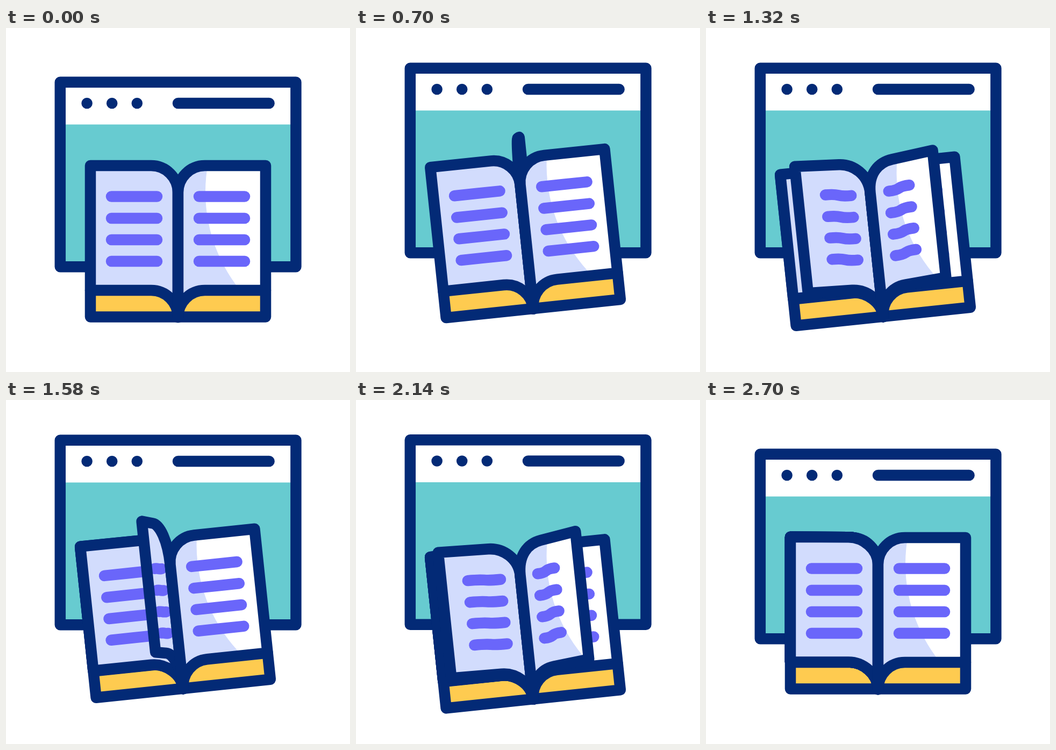
Animation, 640 px wide and 640 px high, one loop 3600 ms. Source, as an HTML page with a canvas:

```html
<!DOCTYPE html>
<html lang="en">
<head>
<meta charset="utf-8">
<title>Online book</title>
<style>
  html, body { margin: 0; width: 100%; height: 100%; overflow: hidden; background: #fff; }
  canvas { display: block; width: 100vw; height: 100vh; }
</style>
</head>
<body>
<canvas id="stage" width="640" height="640"></canvas>
<script>
const ctx = document.getElementById('stage').getContext('2d');
const NAVY = '#032a76', TEAL = '#67cbd0', LAVENDER = '#d2dcfd',
      VIOLET = '#6a66fa', YELLOW = '#fecb50', WHITE = '#fff';
const LOOP = 3600;
const STROKE = 20.5;

// Book geometry, relative to the middle of the book
const HALF = 163, TOP = -140.5, FOOT = 91.5, BOTTOM = 141, BEND = 50;
const ROWS = [-83, -42.5, -2.5, 37.5];

// Page turns overlap: one starts every TURN_GAP ms
const TURNS = 5, TURN_START = 460, TURN_GAP = 400, TURN_TIME = 505;

// [time, value] keys, eased in and out between neighbours
const WINDOW_Y = [[0, 0], [320, -51], [560, -26], [2120, -26], [2360, -51], [2680, 0]];
const BOOK_Y = [[0, 0], [180, 47.5], [520, 0], [560, 0], [840, -29], [1080, 0],
                [1630, 0], [2000, -29], [2240, 47.5], [2580, 0]];
const BOOK_TILT = [[0, 0], [220, 1], [2240, 1], [2560, 0]];

function valueAt(keys, t) {
  const i = keys.findIndex(k => k[0] > t);
  if (i < 0) return keys[keys.length - 1][1];
  const [t0, a] = keys[i - 1], [t1, b] = keys[i];
  return a + (b - a) * (1 - Math.cos(Math.PI * (t - t0) / (t1 - t0))) / 2;
}

function line(color, x0, y0, x1, y1) {
  ctx.strokeStyle = color;
  ctx.beginPath();
  ctx.moveTo(x0, y0);
  ctx.lineTo(x1, y1);
  ctx.stroke();
}

function drawWindow() {
  ctx.fillStyle = WHITE;
  ctx.fillRect(101, 101, 438.5, 343);
  ctx.fillStyle = TEAL;
  ctx.fillRect(101, 179.5, 438.5, 264.5);
  ctx.strokeStyle = NAVY;
  ctx.strokeRect(100.8, 100.8, 438.6, 343.4);
  ctx.fillStyle = NAVY;
  for (const x of [150.6, 197.2, 243.8]) {
    ctx.beginPath();
    ctx.arc(x, 140, 10.3, 0, Math.PI * 2);
    ctx.fill();
  }
  line(NAVY, 320, 140, 489.6, 140);
}

// Open angle u: 1 lies flat on the right, 0 stands up, -1 lies flat on the left
function pagePath(u, turned) {
  const side = Math.sign(u) || 1, a = Math.abs(u);
  const settle = turned && u < 0 ? a : 0;
  const lift = 38.5 * (1 - u * u) + 1.2 * settle;
  const footLift = 0.64 * lift;
  const tipX = HALF * u;
  const spread = 1 - (1 - a) ** 2;
  const bendX = side * spread * (BEND + 5 * settle);
  const bendLift = 1 - 0.7 * a * (1 - 0.4 * settle);
  const handle = 0.552 * BEND * spread;

  const edge = (base, up) => {
    const tip = [tipX, base - up];
    const bend = [bendX, base - up * bendLift];
    const dx = tip[0] - bend[0], dy = tip[1] - bend[1], d = Math.hypot(dx, dy) || 1;
    return {
      tip, bend,
      c1: [bend[0] - dx / d * handle, bend[1] - dy / d * handle],
      c2: [0, base + BEND * 0.448 - up * 0.5],
      spine: [0, base + BEND]
    };
  };
  const top = edge(TOP, lift), foot = edge(FOOT, footLift);

  const path = new Path2D();
  path.moveTo(...foot.tip);
  path.lineTo(...top.tip);
  path.lineTo(...top.bend);
  path.bezierCurveTo(...top.c1, ...top.c2, ...top.spine);
  path.lineTo(...foot.spine);
  path.bezierCurveTo(...foot.c2, ...foot.c1, ...foot.bend);
  path.closePath();
  return path;
}

function drawRows(u) {
  const side = Math.sign(u), a = Math.abs(u);
  const x0 = side * (36 * (1 - (1 - a) ** 2) + 3 * a ** 7);
  const x1 = side * (8 + 80 * a + 36 * a ** 7);
  const wave = Math.sin(Math.PI * a * a);
  const reach = 0.65 * (x1 - x0);
  ctx.strokeStyle = VIOLET;
  for (const y of ROWS) {
    const y0 = y - 7 * wave, y1 = y - 14.5 * wave;
    ctx.beginPath();
    ctx.moveTo(x0, y0);
    ctx.bezierCurveTo(x0 + reach, y0, x1 - reach, y1, x1, y1);
    ctx.stroke();
  }
}

function drawPage(u, turned = true) {
  const path = pagePath(u, turned);
  ctx.save();
  ctx.clip(path);
  ctx.fillStyle = LAVENDER;
  ctx.fillRect(-200, -220, 400, 400);
  if (u > 0) {
    ctx.fillStyle = WHITE;
    ctx.beginPath();
    ctx.arc(342, -91.5, 291, 0, Math.PI * 2);
    ctx.fill();
  }
  if (Math.abs(u) > 0.12) drawRows(u);
  ctx.restore();
  ctx.strokeStyle = NAVY;
  ctx.stroke(path);
}

function drawBook(t) {
  ctx.fillStyle = YELLOW;
  ctx.fillRect(-HALF, FOOT, 2 * HALF, BOTTOM - FOOT);
  ctx.strokeStyle = NAVY;
  ctx.beginPath();
  ctx.moveTo(-HALF, FOOT);
  ctx.lineTo(-HALF, BOTTOM);
  ctx.lineTo(HALF, BOTTOM);
  ctx.lineTo(HALF, FOOT);
  ctx.stroke();

  const turning = [];
  for (let i = 0; i < TURNS; i++) {
    const p = (t - TURN_START - i * TURN_GAP) / TURN_TIME;
    if (p > 0) turning.push(1 - 2 * Math.min(p, 1));
  }
  // Pages past the spine pass below the resting right page
  const past = u => u < 0.12;
  drawPage(-1, false);
  turning.filter(past).forEach(u => drawPage(u));
  drawPage(1, false);
  turning.filter(u => !past(u)).forEach(u => drawPage(u));
}

function render(t) {
  ctx.fillStyle = WHITE;
  ctx.fillRect(0, 0, 640, 640);
  ctx.lineWidth = STROKE;
  ctx.lineCap = ctx.lineJoin = 'round';

  ctx.save();
  ctx.translate(0, valueAt(WINDOW_Y, t));
  drawWindow();
  ctx.restore();

  const tilt = valueAt(BOOK_TILT, t);
  ctx.save();
  ctx.translate(320 - 5 * tilt, 396.5 + valueAt(BOOK_Y, t));
  ctx.rotate(-6 * tilt * Math.PI / 180);
  drawBook(t);
  ctx.restore();
}

const start = performance.now();
function frame() {
  render((performance.now() - start) % LOOP);
  requestAnimationFrame(frame);
}
frame();
</script>
</body>
</html>
```
